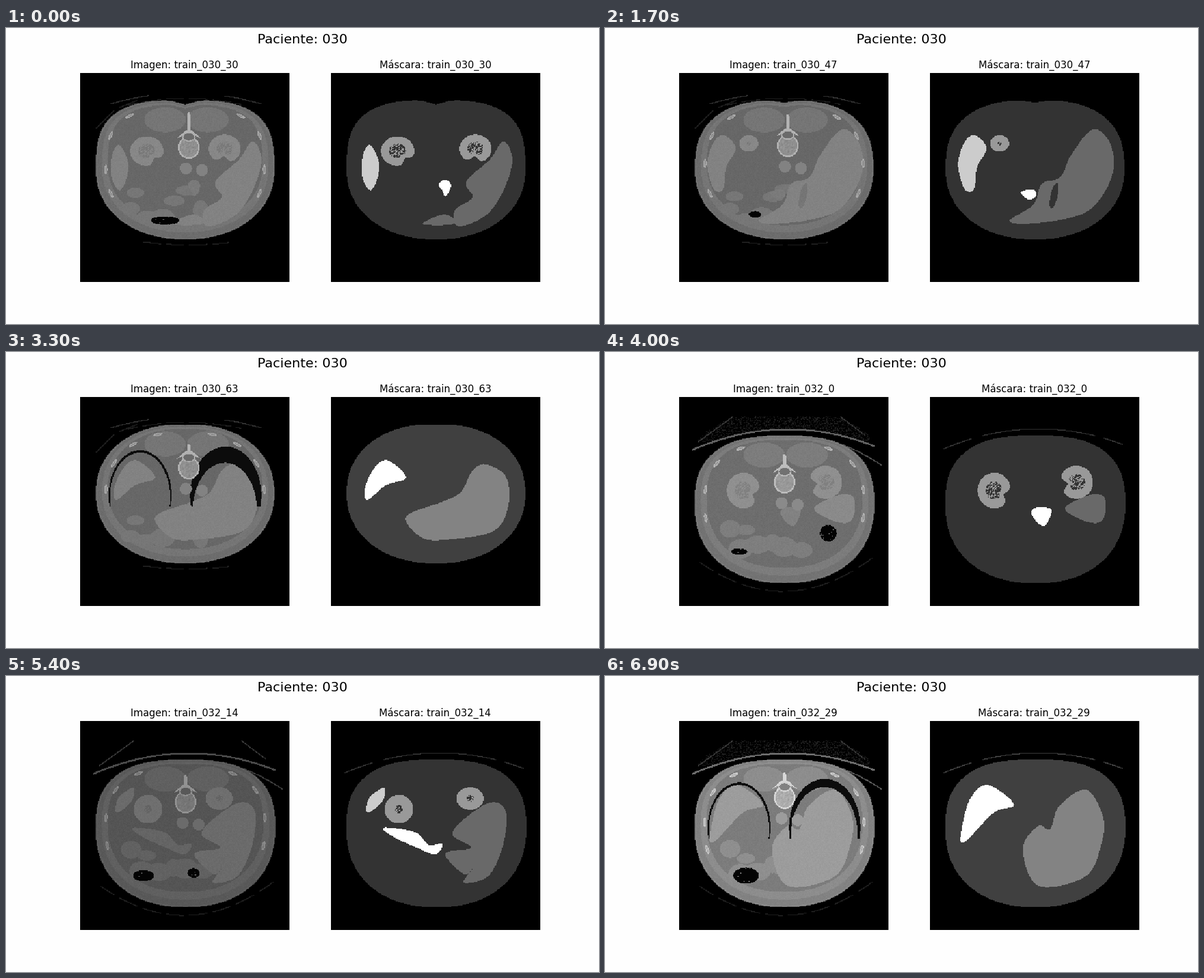
These frames come from a looping animation (1000x500 px, 7 s). A matplotlib script:

```python
import numpy as np
import matplotlib.pyplot as plt
from matplotlib.animation import FuncAnimation

SIZE, SPAN = 256, 352.3           # grid cells and stage pixels per side
IMAGE_X, MASK_X, TOP = 125, 547.7, 76.3
FIRST = 40                        # slices of the first scan
LABELS = {"liver": 2.07, "kidney": 3, "spleen": 4, "pancreas": 5}
TISSUE = {"liver": .51, "kidney": .53, "spleen": .51, "pancreas": .48}
ANGLES = np.linspace(0, 2 * np.pi, 120, endpoint=False)

grain = np.random.default_rng(30).random((SIZE, SIZE))
clumps = (grain + np.roll(grain, 1, 0) + np.roll(grain, 1, 1)) / 3
organs = {}


def smooth(points, count=120):
    """Closed Catmull-Rom curve, sampled evenly along its length."""
    b = np.array(points, float).reshape(-1, 2)
    a, c, d = np.roll(b, 1, 0), np.roll(b, -1, 0), np.roll(b, -2, 0)
    t = np.linspace(0, 1, 12, endpoint=False)[:, None, None]
    curve = b + .5 * ((c - a) * t + (2*a - 5*b + 4*c - d) * t**2
                      + (3*b - a - 3*c + d) * t**3)
    curve = curve.transpose(1, 0, 2).reshape(-1, 2)
    curve = np.vstack([curve, curve[:1]])
    run = np.r_[0, np.cumsum(np.hypot(*np.diff(curve, axis=0).T))]
    at = np.linspace(0, run[-1], count, endpoint=False)
    return np.column_stack([np.interp(at, run, curve[:, k]) for k in (0, 1)])


def ellipse(x, y, rx, ry, turn=0):
    u, v = rx * np.cos(ANGLES), ry * np.sin(ANGLES)
    c, s = np.cos(turn), np.sin(turn)
    return np.column_stack([x + u*c - v*s, y + u*s + v*c])


def bean(x, y, rx, ry, notch, depth=.5):
    """Ellipse with a dent towards the notch angle, in degrees."""
    off = np.angle(np.exp(1j * (ANGLES - np.radians(notch))))
    r = 1 - depth * np.exp(-(off / .35) ** 2)
    return np.column_stack([x + rx * r * np.cos(ANGLES), y + ry * r * np.sin(ANGLES)])


def add(name, frame, *xy):
    organs.setdefault(name, {})[frame] = smooth(xy) - (MASK_X, TOP)


def add_kidney(name, frame, *bean_shape):
    organs.setdefault(name, {})[frame] = bean(*bean_shape) - (MASK_X, TOP)


add("liver", 0, 838,191, 853,222, 840,270, 810,315, 762,335, 756,308, 786,286, 775,260,
    815,222)
add("liver", 17, 822,171, 852,197, 854,250, 815,308, 740,328, 681,327, 722,298, 736,263,
    767,252, 785,215)
add("liver", 33, 808,190, 843,212, 845,265, 820,303, 750,316, 702,314, 674,278, 735,253,
    766,237, 785,202)
add("liver", 40, 815,242, 841,245, 842,275, 828,289, 798,281, 775,263)
add("liver", 54, 820,213, 843,232, 836,290, 812,338, 771,349, 786,325, 772,335, 740,300,
    784,290, 752,267, 780,235)
add("liver", 62, 813,200, 842,225, 833,295, 808,344, 743,352, 717,300, 729,264, 752,261,
    770,220)
add("liver", 69, 810,192, 838,235, 837,280, 810,338, 730,354, 704,292, 730,253, 750,259,
    765,220)
add("liver-lobe", 0, 702,331, 735,315, 754,322, 750,332)

add("spleen", 0, 614,198, 628,225, 626,254, 614,274, 601,253, 602,213)
add("spleen", 17, 623,181, 643,203, 627,235, 622,272, 606,272, 595,230, 606,193)
add("spleen", 33, 643,183, 674,212, 640,225, 609,250, 605,230, 620,197)
add("spleen", 54, 637,189, 634,212, 609,231, 612,206)
add("spleen", 62, 645,185, 649,222, 622,235, 606,281, 599,270, 610,214, 628,190)
add("spleen", 69, 645,184, 689,217, 655,231, 605,281, 601,260, 615,208)

add("pancreas", 0, 739,256, 750,265, 741,284, 735,275, 729,264)
add("pancreas", 17, 701,277, 722,273, 726,284, 714,290)
add("pancreas", 40, 725,263, 751,265, 748,283, 737,294, 719,275)
add("pancreas", 54, 637,256, 690,264, 712,285, 735,283, 724,301, 690,289, 650,270)

add_kidney("kidney-left", 0, 660, 208, 28, 25, 50, .35)
add_kidney("kidney-left", 17, 665, 195, 16, 14, 50, 0)
add_kidney("kidney-right", 0, 791, 204, 27, 24, 95, .5)
add_kidney("kidney-left", 40, 656, 234, 28, 30, 20, .4)
add_kidney("kidney-right", 40, 794, 220, 28, 28, 170, .5)
add_kidney("kidney-left", 54, 662, 225, 24, 24, 130, 0)
add_kidney("kidney-right", 54, 782, 207, 23, 19, 130, 0)


def fill(shape):
    """Even-odd scan fill of a polygon in panel pixels."""
    x0, y0 = shape.T * SIZE / SPAN
    x1, y1 = np.roll(x0, -1), np.roll(y0, -1)
    row = np.arange(SIZE)[:, None] + .5
    r, e = np.nonzero((y0 <= row) != (y1 <= row))
    x = x0[e] + (r + .5 - y0[e]) * (x1[e] - x0[e]) / (y1[e] - y0[e])
    crossings = np.zeros((SIZE, SIZE + 1), int)
    np.add.at(crossings, (r, np.clip(np.ceil(x - .5), 0, SIZE).astype(int)), 1)
    return np.cumsum(crossings, 1)[:, :SIZE] % 2 == 1


def oval(*args):
    """Filled ellipse given in stage pixels of the left panel."""
    return fill(ellipse(*args) - (IMAGE_X, TOP))


def stroke(img, x, y, value, broken=False):
    at = np.linspace(0, len(x) - 1, 900)
    cx, cy = np.interp(at, range(len(x)), x), np.interp(at, range(len(y)), y)
    c, r = (np.array([cx - IMAGE_X, cy - TOP]) * SIZE / SPAN).astype(int)
    ok = np.sin(cx * .16) > -.75 if broken else slice(None)
    img[r[ok], c[ok]] = np.maximum(img[r[ok], c[ok]], value)


def arc(x0, x1, y, bend, middle=308):
    x = np.linspace(x0, x1, 120)
    return x, y + bend * (x - middle) ** 2


def body_outline(n):
    """Superellipse with a dent over the spine; returns centre and curve."""
    if n < FIRST:
        x, y, rx, up, down = 301.8, 239, 150.5, 117.5, 118
        p_top, p_low, dent = 3 - .024 * n, 2.15, 8 - .2 * n
    else:
        x, y, rx, up, down = 302.3, 258, 151.5, 117, 132.5
        p_top, p_low, dent = 2.65, 2.22, 0
    c, s = np.cos(ANGLES), np.sin(ANGLES)
    power = 2 / np.where(s < 0, p_top, p_low)
    u = rx * np.sign(c) * abs(c) ** power
    v = np.where(s < 0, up, down) * np.sign(s) * abs(s) ** power
    v += (s < 0) * dent * np.exp(-(u / 18) ** 2)
    mid = np.array([x - IMAGE_X, y - TOP])
    return mid, mid + np.column_stack([u, v])


def organ_shapes(n):
    """Blend the key outlines; organs without a partner grow or shrink."""
    keys = [k for k in organs["liver"] if (k < FIRST) == (n < FIRST)]
    a = max(k for k in keys if k <= n)
    b = min([k for k in keys if k > n], default=a)
    t = (n - a) / max(b - a, 1)
    shapes = {}
    for name, keyed in organs.items():
        if a in keyed and b in keyed:
            shapes[name] = keyed[a] * (1 - t) + keyed[b] * t
        elif a in keyed or b in keyed:
            shape, size = (keyed[a], 1 - t) if a in keyed else (keyed[b], t)
            if size > .3:
                mid = shape.mean(0)
                shapes[name] = mid + (shape - mid) * size
    return shapes


def hollow(shape, n):
    """Speckled core of a kidney, smaller away from the first slice of a scan."""
    size = .5 - .016 * (n % FIRST)
    if size < .2:
        return np.zeros((SIZE, SIZE), bool)
    return fill(shape.mean(0) + (shape - shape.mean(0)) * size) & (clumps > .46)


def cleft(n):
    """Dark gap inside the liver, open around one slice of each scan."""
    x, y, peak, turn = (334, 283, 17, 1.8) if n < FIRST else (342, 304, 62, 1.1)
    size = max(1 - abs(n - peak) / 7, .01)
    return oval(x, y, 22 * size, 6 * size, turn)


def draw_table(img, n, g):
    if n < FIRST:
        for x0, x1 in [(177, 240), (368, 430)]:
            stroke(img, *arc(x0, x1, 110, .00115, 303), .2)
        stroke(img, *arc(205, 395, 119, .0012, 303), .13, True)
        stroke(img, (143, 185, 225), (178, 137, 121), .12, True)
        stroke(img, *arc(232, 375, 366, -.0008), .13, True)
        return
    if g > .95:
        pad = smooth([90, 36, 180, 34, 272, 36, 318, 74, 180, 53, 34, 76])
        img[fill(pad) & (grain > .72)] = .12
    for x0, x1, y1 in [(215, 157, 152), (397, 437, 140)]:
        stroke(img, (x0, x1), (110, y1), .22)
    for y in (130, 131.4):
        stroke(img, *arc(148, 453, y, .00135), .36 * g)
    stroke(img, *arc(380, 465, 139, .0021), .3 * g)
    stroke(img, *arc(160, 450, 404, -.0025, 300), .12, True)


def draw_spine(img, n, g):
    k = n if n < FIRST else n - FIRST
    x, canal, tip = ((308, 184 - .18 * k, 143 + .6 * max(k - 12, 0)) if n < FIRST
                     else (302.5, 202 - .5 * k, 172 - .3 * k))
    spike = np.array([(x - 3, canal), (x - 2, tip), (x + 2, tip), (x + 3, canal)])
    arch = np.array([(-21, 3), (-5, -11), (5, -11), (21, 3), (10, -2), (-10, -2)])
    for shape in (spike, arch + (x, canal)):
        img[fill(shape - (IMAGE_X, TOP))] = .7 * g
    y = canal + 18
    img[oval(x, y, 18, 19)] = .7 * g
    core = oval(x, y, 15.5, 16.5)
    img[core] = (.5 + .12 * clumps[core]) * g
    img[oval(x, canal, 11, 8)] = .68 * g
    img[oval(x, canal, 9, 6)] = .42 * g
    for dx, dy in [(-5, 35), (22, 38)]:
        img[oval(x + dx, y + dy, 10, 10)] = .51 * g


def draw_bowel(img, n, belly, g):
    loops = np.random.default_rng(5 if n < FIRST else 9)
    for x in np.linspace(205, 325, 7):
        dx, dy, rx, ry = loops.uniform((-8, 20, 10, 8), (8, 80, 22, 17))
        img[oval(x + dx, belly + dy + 4 * np.sin(n / 9 + x), rx, ry)] = .465 * g


def draw_air(img, n):
    k = n if n < FIRST else n - FIRST
    if n < FIRST:
        pockets = [(268 - .9 * k, 325 - .6 * k, 24 - .8 * k, 7 - .1 * k)]
    else:
        size = 11 - .9 * abs(k - 15)
        pockets = [(226 + .4 * k, 337, 14 + .25 * k, 5 + .3 * k),
                   (393 - 5.5 * k, 313 + 1.4 * k, size, size * .8),
                   (376, 306, 14 - k, 14 - k)]
    for x, y, rx, ry in pockets:
        if min(rx, ry) > 0:
            img[oval(x, y, rx, ry) & (clumps > .2)] = .015


def draw_lungs(img, n):
    """Crescents left between the chest wall and the domes beneath it."""
    y, depth = (242, 2 * (n - 20)) if n < FIRST else (256, 1.8 * (n - 62))
    if depth <= 0:
        return
    above = np.arange(SIZE)[:, None] < (y + 18 - TOP) * SIZE / SPAN
    for x, rx, ry, sink in [(370, 60, 82, depth), (226, 53, 76, 3)]:
        dome = oval(x - .05 * sink, y + sink, rx - 2 - .15 * sink, ry - 1)
        img[oval(x, y, rx, ry) & ~dome & above] = .05


def draw_ribs(img, n, mid, body, g):
    """Rib sections climb steadily along the wall on both sides."""
    wall = mid + (body - mid) * .885
    heading = np.arctan2(*(wall - mid).T[::-1])
    for side in (0, 1):
        for rib in range(4):
            rise = np.radians(-18 + 21 * rib + 1.25 * n % 21)
            goal = rise - np.pi if side else -rise
            goal = -np.pi + rise if side else -rise
            i = np.argmin(abs(np.exp(1j * heading) - np.exp(1j * goal)))
            tangent = np.arctan2(*(wall[(i + 1) % len(wall)] - wall[i - 1])[::-1])
            for rx, ry, tone in [(8, 2.6, .66), (5, 1.2, .56)]:
                img[fill(ellipse(*wall[i], rx, ry, tangent))] = tone * g


def scan(n, shapes):
    g = np.interp(n, (39, 40, 54, 62, 69), (1, 1.06, .82, 1.1, 1.2))
    img = np.zeros((SIZE, SIZE))
    mid, body = body_outline(n)
    inside = fill(body)
    draw_table(img, n, g)
    for scale, tone in [(1, .36), (.992, .46), (.982, .425), (.93, .46), (.865, .405)]:
        lift = 8 if scale < .9 else 4 if scale < .95 else 0
        img[fill(mid + (body - mid) * scale - (0, lift))] = tone * g

    back = body[:, 1].min() + TOP + 33
    for x in (268, 340):
        img[oval(x, back, 35, 21)] = .46 * g
    draw_bowel(img, n, mid[1] + TOP, g)
    for name, shape in shapes.items():
        img[fill(shape) & inside] = TISSUE[name.split("-")[0]] * g
        if "kidney" in name:
            img[hollow(shape, n)] = .47 * g
    img[cleft(n)] = .46 * g
    draw_lungs(img, n)
    draw_air(img, n)
    img[inside] += (grain[inside] - .5) * .03 * (img[inside] > .1)
    draw_ribs(img, n, mid, body, g)
    draw_spine(img, n, g)
    return np.clip(img, 0, 1)


def segment(n, shapes):
    labels = np.zeros((SIZE, SIZE))
    if n >= FIRST:
        for x0, x1 in [(148, 195), (214, 402), (418, 449)]:
            stroke(labels, *arc(x0, x1, 130, .00132), 1)
    labels[fill(body_outline(n)[1])] = 1
    for name, shape in shapes.items():
        labels[fill(shape)] = LABELS[name.split("-")[0]]
        if "kidney" in name:
            labels[hollow(shape, n)] = 1
    labels[cleft(n) & (labels == LABELS["liver"])] = 1
    return labels / labels.max()


fig, axes = plt.subplots(1, 2, figsize=(10, 5), dpi=100, facecolor="#fefefe")
fig.suptitle("Paciente: 030", fontsize=16)
views = []
for ax in axes:
    views.append(ax.imshow(np.zeros((SIZE, SIZE)), cmap="gray", vmin=0, vmax=1,
                           interpolation="nearest"))
    ax.axis("off")


def update(n):
    name = f"train_030_{n + 30}" if n < FIRST else f"train_032_{n - FIRST}"
    shapes = organ_shapes(n)
    for ax, view, word, picture in zip(axes, views, ("Imagen", "Máscara"), (scan, segment)):
        view.set_data(picture(n, shapes))
        ax.set_title(f"{word}: {name}", fontsize=12)
    return views


anim = FuncAnimation(fig, update, frames=70, interval=100, init_func=lambda: update(0),
                     repeat=True, repeat_delay=0)
plt.show()
```
